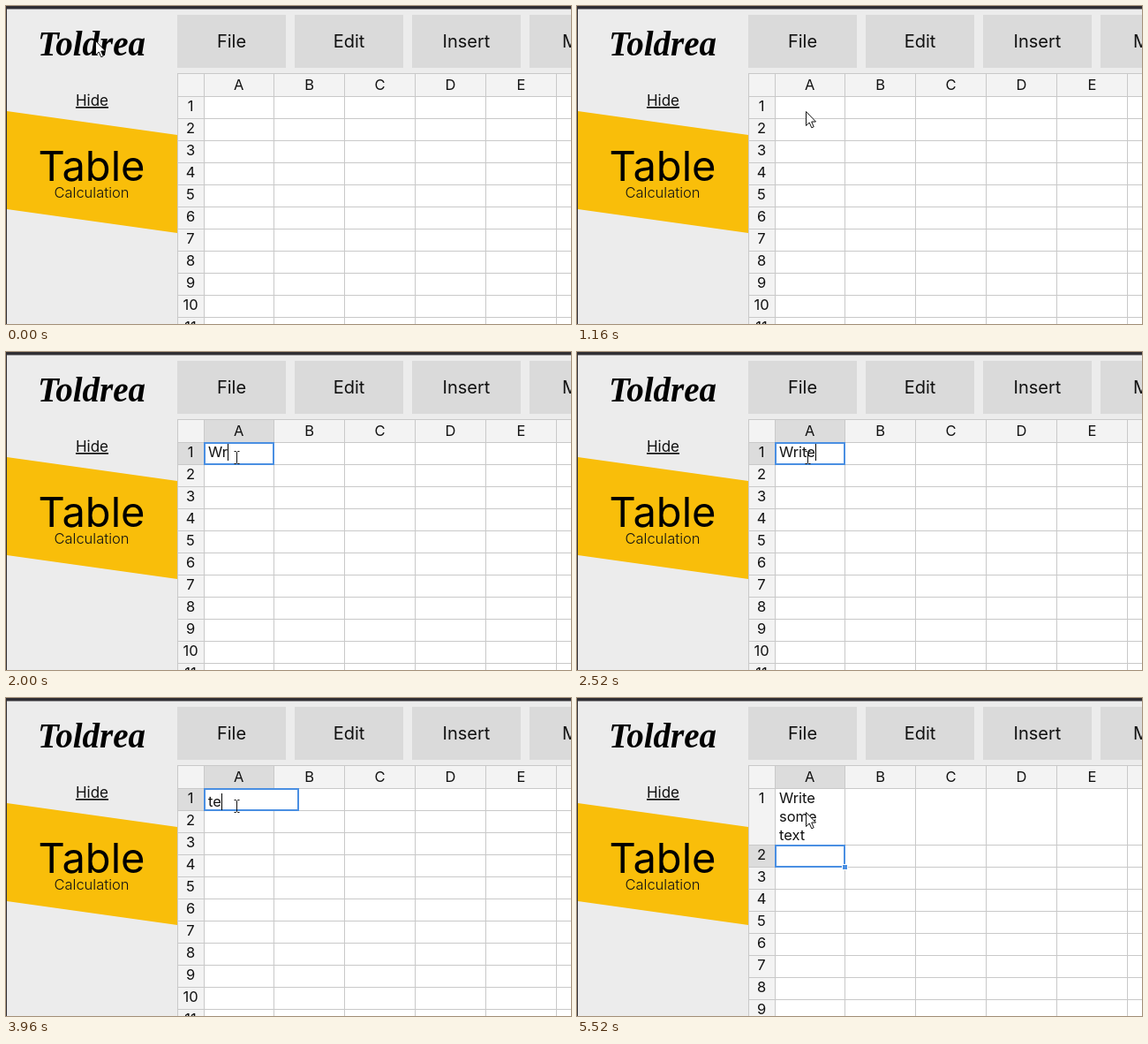
Animation of 640 by 360 pixels, one loop 6000 ms. Source, as an HTML page:

```html
<!DOCTYPE html>
<html lang="en">
<head>
<meta charset="utf-8">
<title>Table calculation</title>
<style>
  html, body { margin: 0; width: 100%; height: 100%; overflow: hidden; background: #ececec; }
  svg { display: block; width: 100%; height: 100%; }
  text { font: 16.5px Inter, sans-serif; fill: #111; white-space: pre; }
  .mid { text-anchor: middle; }
  .menu { font-size: 20px; }
  .title { font-size: 47px; fill: #000; }
  .light { font-weight: 300; }
  .link { font-size: 17px; text-decoration: underline; }
  .brand { font: italic bold 39px "Liberation Serif", serif; fill: #000; }
</style>
</head>
<body>
<svg id="stage" viewBox="0 0 640 360"></svg>
<script>
const LOOP = 6000, STEP = 40;
const CLICK = 1200, TYPE = 1650, KEY = 190, LAG = 80, ENTER = 5400, BLINK = 530;
const PHRASE = 'Write some text';
const TEXT_X = 229, PAD = 5, CELL_X = 224, CELL_R = 304;
const BLUE = '#4a8fe2', LINE = '#c9c9c9', HEAD = '#f3f3f3', ACTIVE = '#dcdcdc';

const stage = document.getElementById('stage');

function add(tag, attrs, parent = stage) {
  const el = document.createElementNS('http://www.w3.org/2000/svg', tag);
  set(el, attrs);
  parent.append(el);
  return el;
}
function set(el, attrs) {
  for (const k in attrs) el.setAttribute(k, attrs[k]);
}
function rect(x, y, width, height, fill, parent) {
  return add('rect', { x, y, width, height, fill }, parent);
}
function label(str, x, y, cls = '', parent = stage) {
  const el = add('text', { x, y, class: cls }, parent);
  el.textContent = str;
  return el;
}
function show(el, on) {
  el.setAttribute('visibility', on ? 'visible' : 'hidden');
}

// Window frame and side panel
rect(0, 0, 640, 360, '#ececec');
rect(0, 0, 640, 3.5, '#302e33');
rect(0, 0, 1, 360, '#302e33');
label('Toldrea', 97, 56, 'mid brand');
label('Hide', 97.5, 113, 'mid link');
add('path', { d: 'M1 119L194 146V257L1 230Z', fill: '#f9be0a' });
label('Table', 97, 198, 'mid title');
label('Calculation', 97, 217, 'mid light');

// Menu
['File', 'Edit', 'Insert', 'More'].forEach((name, i) => {
  const x = 194 + 133 * i;
  rect(x, 10, 123, 60, '#dadada');
  label(name, x + 61.5, 47, 'mid menu');
});

// Sheet
rect(194, 76, 446, 284, '#fff');
rect(194, 76, 446, 27, HEAD);
rect(194, 76, 31, 284, HEAD);
const colMark = rect(225, 77, 78, 25, ACTIVE);
const rowMark = rect(195, 103, 29, 24, ACTIVE);
rect(194, 76, 446, 1, LINE);
rect(194, 102, 446, 1, LINE);
rect(194, 76, 1, 284, LINE);
for (let i = 0; i < 6; i++) {
  rect(Math.max(224, 223 + 80 * i), 76, 1, 284, LINE);
  label('ABCDEF'[i], 263.7 + 79.95 * i, 95, 'mid');
}
label('1', 209, 119, 'mid');
const rows = add('g', {});
for (let i = 0; i < 10; i++) {
  const y = 127 + 25 * i;
  rect(194, y, 446, 1, LINE, rows);
  label(i + 2, 209, y + 17, 'mid', rows);
}
const wrapped = add('g', {});
PHRASE.split(' ').forEach((word, i) => label(word, TEXT_X, 119 + 21 * i, '', wrapped));

// Selection and editor
const box = add('rect', { x: 225, y: 103, width: 78, height: 24, fill: '#fff', stroke: BLUE, 'stroke-width': 2 });
const handle = add('rect', { x: 300.5, y: 124.5, width: 6, height: 6, fill: BLUE, stroke: '#fff' });
const entry = label('', TEXT_X, 119);
const caret = rect(0, 104, 1, 19, '#000');

// Pointers
const arrow = add('path', {
  d: 'M.5 .5V16.5L4.2 13L6.8 18.8L9.2 17.7L6.7 12H11.5Z',
  fill: '#fff', stroke: '#111', 'stroke-linejoin': 'round'
});
const beam = add('path', {
  d: 'M-3 -7H-1L0 -6L1 -7H3M0 -6V6M-3 7H-1L0 6L1 7H3',
  fill: 'none', stroke: '#111'
});

const widths = Array.from({ length: PHRASE.length + 1 }, (_, n) => {
  entry.textContent = PHRASE.slice(0, n);
  return n ? entry.getComputedTextLength() : 0;
});
const boxEnd = n => Math.max(CELL_R, Math.round(TEXT_X + widths[n] + PAD));

function ease(t, from, to) {
  const p = Math.min(1, Math.max(0, (t - from) / (to - from)));
  return p * p * (3 - 2 * p);
}

function drawEntry(t) {
  const n = Math.min(PHRASE.length, Math.floor((t - TYPE) / KEY) + 1);
  const age = t - TYPE - (n - 1) * KEY;
  const typed = PHRASE.slice(0, n);
  // The editor grows shortly after each key, so the last word wraps until then.
  const late = age < LAG;
  const right = boxEnd(late ? n - 1 : n);
  const wraps = late && !typed.endsWith(' ') && boxEnd(n) > right;
  const text = wraps ? typed.split(' ').pop() : typed;
  entry.textContent = text;
  set(entry, { y: wraps ? 123 : 119 });
  const w = wraps ? entry.getComputedTextLength() : widths[n];
  set(caret, { x: Math.round(TEXT_X + w), y: wraps ? 108 : 104 });
  set(box, { width: right - CELL_X - 2 });
  show(caret, age < BLINK);
}

function draw(time) {
  const t = Math.floor(time / STEP) * STEP;
  const selected = t >= CLICK, done = t >= ENTER;
  const editing = t >= TYPE && !done;
  const shift = done ? 39 : 0;
  const markShift = done ? 64 : 0;

  set(rows, { transform: `translate(0 ${shift})` });
  set(rowMark, { y: 103 + markShift });
  set(box, { y: 103 + markShift, width: 78 });
  set(handle, { y: 124.5 + markShift });
  show(colMark, selected);
  show(rowMark, selected);
  show(box, selected);
  show(handle, selected && !editing);
  show(wrapped, done);
  show(entry, editing);
  show(caret, false);
  if (editing) drawEntry(t);

  const go = ease(t, 40, 720);
  const x = Math.round(101 + 158 * go);
  const y = Math.round(39 + 80 * go + 10 * ease(t, 3880, 4120));
  set(arrow, { transform: `translate(${x} ${y})` });
  set(beam, { transform: `translate(${x + 2.5} ${y + 0.5})` });
  show(arrow, !editing);
  show(beam, editing);
}

const start = performance.now();
function frame() {
  draw((performance.now() - start) % LOOP);
  requestAnimationFrame(frame);
}
draw(0);
requestAnimationFrame(frame);
</script>
</body>
</html>
```
